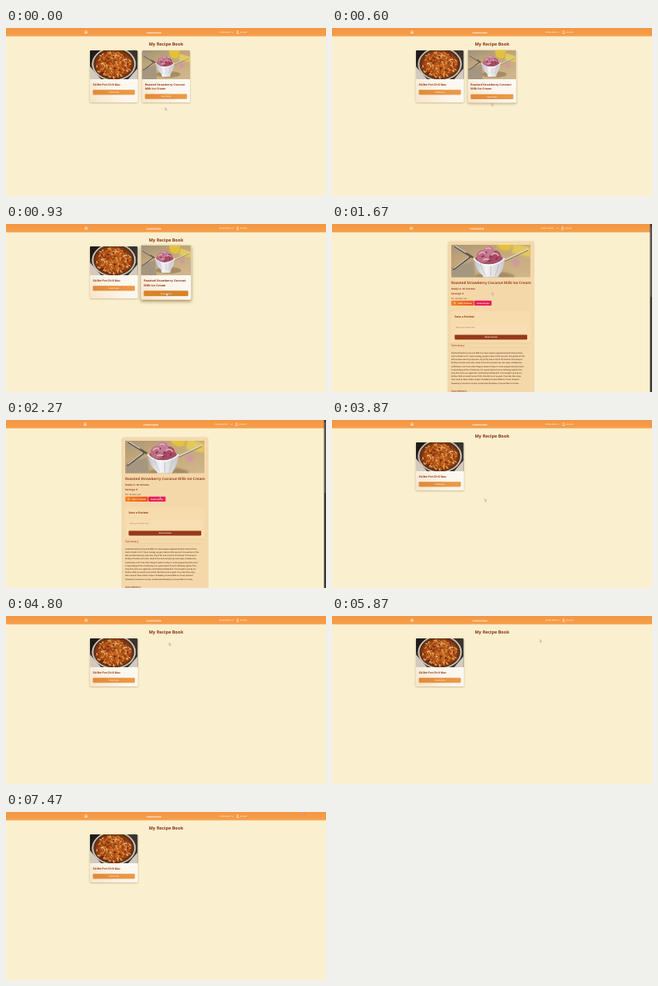
Recreate the animation shown at these times as an HTML page. Size 400 by 210 pixels, loop 8.4 s.

```html
<!DOCTYPE html>
<html lang="en">
<head>
<meta charset="utf-8">
<title>My Recipe Book</title>
<style>
html, body { margin: 0; width: 100%; height: 100%; overflow: hidden; background: #faf0cf; }
svg { display: block; width: 100vw; height: 100vh; }
text { font-family: "Open Sans", "Noto Sans", sans-serif; text-rendering: geometricPrecision; }
.bold { font-weight: 700; }
.semi { font-weight: 600; }
.mid { text-anchor: middle; }
.brown { fill: #8c3515; }
.white { fill: #fff; }
.shade { fill: #7a5a20; opacity: .4; filter: blur(.8px); }

.book, .detail, .pair, .single, .press, .arrow, .hand { animation: 8.4s step-end infinite; }
.book { animation-name: book; }
.detail { animation-name: detail; }
.pair { animation-name: pair; }
.single { animation-name: single; }
.press { animation-name: press; }
.arrow { animation-name: arrow; }
.hand { animation-name: hand; }
.lift { animation: lift 8.4s infinite; transform-origin: 200px 60.5px; }
.lift .glow { animation: glow 8.4s infinite; }
.glow { fill: #7a5a20; opacity: 0; filter: blur(1.8px); }
.dim { opacity: 0; }
.lift .dim { animation: dim 8.4s infinite; }
.cursor { animation: move 8.4s linear infinite; }

@keyframes book { 0%, 41.27% { visibility: visible } 19.84% { visibility: hidden } }
@keyframes detail { 0%, 41.27% { visibility: hidden } 19.84% { visibility: visible } }
@keyframes pair { 0% { visibility: visible } 19.84%, 100% { visibility: hidden } }
@keyframes single { 0% { visibility: hidden } 46.03%, 100% { visibility: visible } }
@keyframes press { 0% { fill: #ea1f58 } 34.1% { fill: #cf1a3a } 41.27%, 100% { fill: #ea1f58 } }
@keyframes arrow { 0%, 19.84%, 41.27% { opacity: 1 } 9.5%, 34.1% { opacity: 0 } }
@keyframes hand { 0%, 19.84%, 41.27% { opacity: 0 } 9.5%, 34.1% { opacity: 1 } }
@keyframes lift { 0%, 6.3% { transform: none } 10.7%, 100% { transform: scale(1.05) } }
@keyframes glow { 0%, 6.3% { opacity: 0 } 10.7%, 100% { opacity: .5 } }
@keyframes dim { 0%, 8.7% { opacity: 0 } 10.7%, 100% { opacity: 1 } }
@keyframes move {
  0%, 5% { transform: translate(199px, 99.5px) }
  10.5%, 23% { transform: translate(200px, 85.5px) }
  27%, 32.5% { transform: translate(192px, 95.5px) }
  34.1%, 52.4% { transform: translate(191px, 98.5px) }
  57.1%, 62.7% { transform: translate(204px, 33.5px) }
  69.8% { transform: translate(257.3px, 30px) }
  73% { transform: translate(351px, 9px) }
  76.19%, 100% { transform: translate(371px, .2px) }
}
</style>
</head>
<body>
<svg viewBox="0 0 400 210" preserveAspectRatio="none">
  <defs>
    <linearGradient id="bar" x2="0" y2="1"><stop stop-color="#f39642"/><stop offset="1" stop-color="#f79f4c"/></linearGradient>
    <linearGradient id="paper" x1="0" y1="1" x2=".7" y2=".2"><stop stop-color="#f7e4c8"/><stop offset=".5" stop-color="#fcf6ec"/><stop offset="1" stop-color="#fdfaf6"/></linearGradient>
    <linearGradient id="btn"><stop stop-color="#e08a38"/><stop offset="1" stop-color="#ee9a48"/></linearGradient>
    <linearGradient id="fire"><stop stop-color="#f58420"/><stop offset="1" stop-color="#e9531e"/></linearGradient>
    <linearGradient id="table" x2=".5" y2="1"><stop stop-color="#9c8f7c"/><stop offset=".45" stop-color="#c2a678"/><stop offset="1" stop-color="#cfb58a"/></linearGradient>
    <linearGradient id="bowl"><stop stop-color="#b9bec8"/><stop offset=".4" stop-color="#f3f3f4"/><stop offset="1" stop-color="#c9c8ca"/></linearGradient>
    <radialGradient id="stew"><stop stop-color="#c8671f"/><stop offset=".75" stop-color="#a94a16"/><stop offset="1" stop-color="#6f2f10"/></radialGradient>
    <filter id="soft"><feGaussianBlur stdDeviation=".7"/></filter>
    <clipPath id="top"><path d="M0 36V1.5Q0 0 1.5 0H58.5Q60 0 60 1.5V36Z"/></clipPath>
    <clipPath id="wide"><rect x="149" y="26" width="99" height="40.5"/></clipPath>
    <g id="sundae">
      <rect width="60" height="40" fill="url(#table)"/>
      <g filter="url(#soft)">
        <path d="M0 25L17 20L19 40H0Z" fill="#a5977f"/>
        <path d="M33 0H48L45 11Q40 14 35 9Z" fill="#e2c23c"/>
        <path d="M47 6L60 10V17L46 14Z" fill="#e3c85a"/>
        <circle cx="49" cy="21" r="3" fill="#cf9aa0"/>
        <ellipse cx="33" cy="32" rx="15" ry="4" fill="#8c7350" opacity=".6"/>
      </g>
      <g fill="none" stroke-linecap="round">
        <path d="M3 9L11 14L16 17M2 26L14 17" stroke="#5f564c" stroke-width="1.6"/>
        <path d="M3 8.5L11 13.500M2 25.500L13 17" stroke="#ddd8d0" stroke-width=".7"/>
        <path d="M41 19L58 11" stroke="#d9d4cb" stroke-width="1"/>
        <path d="M41 20L58 12" stroke="#75684f" stroke-width=".5"/>
      </g>
      <path d="M17 18Q18 27 24 31L25 35H35L36 31Q40 26 40.500 18Q29 13 17 18Z" fill="url(#bowl)"/>
      <ellipse cx="28.700" cy="18.500" rx="10.500" ry="4" fill="#a24d66"/>
      <circle cx="24" cy="16.500" r="4.800" fill="#bd6d84"/>
      <circle cx="33" cy="16.500" r="4.600" fill="#a94b66"/>
      <circle cx="28.500" cy="12.800" r="4.200" fill="#c47d92"/>
      <path d="M21 15q2-3 5-1M31 15q3-2 5 1M26 11q2-2 4 0M24 19q3-1 5 0" fill="none" stroke="#e3b3c0" stroke-width="1"/>
      <path d="M23 17l2-1M29 16l2 1M34 19l1-2M28 20l2-1M26 13l1 1" stroke="#84304d" stroke-width="1"/>
      <path d="M17 18Q22 23.500 29 23T40.500 18" fill="none" stroke="#fbfbfb" stroke-width="1"/>
      <path d="M22 22Q24 27 26 31M30 24V31M36 22Q35 27 33.500 31" fill="none" stroke="#aeb0b8" stroke-width=".4"/>
    </g>
    <g id="chili">
      <rect width="60" height="36" fill="#3b322c"/>
      <path d="M0 20L14 36H0ZM60 22L48 36H60Z" fill="#d3cabd"/>
      <path d="M0 0H14L3 14L0 20Z" fill="#201b19"/>
      <ellipse cx="30" cy="17" rx="27.500" ry="21" fill="#cbc4bb"/>
      <ellipse cx="30" cy="17" rx="25.500" ry="19.500" fill="#5a3018"/>
      <ellipse cx="30" cy="17.500" rx="24" ry="18" fill="url(#stew)"/>
      <g id="noodles" fill="none" stroke-linecap="round"></g>
    </g>
  </defs>

  <rect width="400" height="210" fill="#faf0cf"/>

  <g class="book">
    <g id="bookBar"></g>
    <text x="200" y="22" font-size="5.5" class="bold mid brown">My Recipe Book</text>
  </g>
  <g id="pair" class="pair"></g>
  <g id="single" class="single"></g>

  <g class="detail">
    <rect width="400" height="210" fill="#fbf0cd"/>
    <g id="detailBar"></g>
    <rect x="397.5" width="2.5" height="210" fill="#3a3735"/>
    <rect x="398.3" y="3" width="1" height="88" fill="#77716c"/>
    <rect class="shade" x="145.5" y="22.5" width="106.5" height="200" rx="1.5"/>
    <rect x="145.5" y="22" width="106.5" height="200" rx="1.5" fill="#f5d8aa"/>
    <g clip-path="url(#wide)"><use href="#sundae" transform="translate(149 13.3) scale(1.65)"/></g>
    <text x="149" y="74.7" font-size="4.55" class="bold" fill="#98441f">Roasted Strawberry Coconut Milk Ice Cream</text>
    <g font-size="2.9" class="brown">
      <text x="149" y="82"><tspan class="bold">Ready in:</tspan> <tspan class="bold">45 minutes</tspan></text>
      <text x="149" y="88" class="bold">Servings: 8</text>
      <text x="149" y="93.7">No reviews yet</text>
    </g>
    <rect x="149" y="95.7" width="28.5" height="6.4" rx="1" fill="url(#fire)"/>
    <circle cx="153.300" cy="98.700" r="1" fill="none" stroke="#fff" stroke-width=".4"/>
    <path d="M154 99.400l.9.9" stroke="#fff" stroke-width=".4"/>
    <text x="166.3" y="99.7" font-size="2.2" class="bold mid white">START COOKING</text>
    <rect class="press" x="178" y="95.7" width="21.5" height="6.4" rx="1"/>
    <text x="188.7" y="99.7" font-size="2.3" class="bold mid white">Delete Recipe</text>
    <rect x="149" y="109" width="99" height="38.5" rx="1" fill="#f7dcae"/>
    <text x="153.3" y="116.7" font-size="3.5" class="bold brown">Save a Review</text>
    <text x="153.5" y="123.6" font-size="4" letter-spacing="1.35" fill="#dfd0ac" style="font-family:'DejaVu Sans',sans-serif">☆☆☆☆☆</text>
    <rect x="153.300" y="126" width="90.700" height="10.500" rx=".8" fill="#f8deb2"/>
    <text x="154.800" y="130" font-size="2.250" fill="#94603a">Write your review here</text>
    <rect x="153.3" y="138.6" width="90.7" height="5.8" rx=".8" fill="#98391a"/>
    <text x="198.700" y="142.300" font-size="2.200" class="bold mid white">Submit Review</text>
    <path d="M149 149.300H248M149 154.600H248" stroke="#dfb67c" stroke-width=".3"/>
    <text x="149" y="153.200" font-size="3.700" class="brown">Summary</text>
    <g id="summary" font-size="2.2" fill="#4f2410" class="semi"></g>
    <text x="149" y="209.800" font-size="3.700" class="brown">Ingredients</text>
  </g>

  <g class="cursor">
    <path class="arrow" d="M0 0V3L.7 2.400L1.200 3.500L1.700 3.300L1.200 2.200H2.100Z" fill="#fff" stroke="#5b5048" stroke-width=".3"/>
    <path class="hand" d="M.5 0Q1 0 1 .5V1.500L2.700 1.900Q3 2 2.900 2.600L2.500 3.900H.9L-.4 2.400Q-.4 1.900 .1 2.100V.5Q.1 0 .5 0Z" fill="#fff" stroke="#4a2b22" stroke-width=".3"/>
  </g>
</svg>
<script>
const fill = (id, html) => { document.getElementById(id).innerHTML = html; };

const bar = (menu, brand, nav, label, arrow, user) => `
  <rect width="400" height="10.4" fill="url(#bar)"/>
  <path d="M${menu} 4.1h3.6m-3.6 1.3h3.6m-3.6 1.3h3.6" stroke="#fff" stroke-width=".6"/>
  <text x="${brand}" y="6.6" font-size="3" class="bold mid white">Cookmellow</text>
  <g font-size="2.3" class="white semi">
    <text x="${nav}" y="6.1">${label}</text>
    <text x="${user + 4.5}" y="6.1">Account</text>
  </g>
  <g fill="none" stroke="#fff" stroke-width=".5">
    <path d="M${arrow} 4.7l1.1 1.1l1.1 -1.1"/>
    <circle cx="${user + 1.5}" cy="4.3" r=".8"/><path d="M${user} 6.9q1.5 -2.7 3 0z"/>
  </g>`;

const card = (x, height, lines, photo, cls = "") => {
  const btnY = 72.2 + lines.length * 5.1;
  const box = (y, attrs) => `<rect x="${x}" y="${y}" width="60" height="${height}" rx="1.5" ${attrs}/>`;
  const button = attrs => `<rect x="${x + 3.7}" y="${btnY}" width="52.6" height="6.3" rx="1" ${attrs}/>`;
  return `<g class="${cls}">
    ${box(30.5, 'class="glow"')}${box(28.7, 'class="shade"')}${box(28, 'fill="url(#paper)"')}
    <g transform="translate(${x} 28)" clip-path="url(#top)">${photo}</g>
    ${lines.map((s, i) => `<text x="${x + 3.7}" y="${71.7 + i * 5.1}" font-size="3.5" class="bold brown">${s}</text>`).join("")}
    ${button('fill="url(#btn)"')}${button('class="dim" fill="#d8832a"')}
    <text x="${x + 30}" y="${btnY + 3.9}" font-size="2.25" class="semi mid white">View Recipe</text>
  </g>`;
};

let seed = 11;
const rand = () => (seed = seed * 16807 % 2147483647) / 2147483647;
const tones = ["#efb055", "#d4691f", "#f6cf82", "#8f3410", "#d9832f", "#5c200c"];
let noodles = "";
for (let i = 0; i < 230; i++) {
  const a = rand() * Math.PI * 2, r = Math.sqrt(rand()), turn = rand() * 360;
  const x = 30 + Math.cos(a) * r * 22.5, y = 17.5 + Math.sin(a) * r * 16.5;
  noodles += `<path d="M-1.2 0q1.2 -1.4 2.4 0" stroke="${tones[i % tones.length]}" stroke-width="${(.6 + rand() * .6).toFixed(2)}"
    transform="translate(${x.toFixed(1)} ${y.toFixed(1)}) rotate(${turn.toFixed()})"/>`;
}
fill("noodles", noodles);

const chili = ["Skillet Pot Chili Mac"], sundae = ["Roasted Strawberry Coconut", "Milk Ice Cream"];
const chiliPhoto = '<use href="#chili"/>', sundaePhoto = '<use href="#sundae" y="-2"/>';
fill("bookBar", bar(98.3, 184.8, 267, "Recipe Book", 281.8, 288));
fill("detailBar", bar(97.2, 181, 261.3, "Recipe Details", 280.8, 286.7));
fill("pair", card(104.8, 65, chili, chiliPhoto) + card(170, 65, sundae, sundaePhoto, "lift"));
fill("single", card(104.8, 60, chili, chiliPhoto));

const summary = [
  "Roasted Strawberry Coconut Milk Ice Cream requires approximately 45 minutes from",
  "start to finish. For $1.15 per serving, you get a dessert that serves 8. One portion of this",
  "dish contains about 2g of protein, 21g of fat, and a total of 372 calories. This recipe is",
  "liked by 2 foodies and cooks. Head to the store and pick up cane sugar, strawberries,",
  "vanilla bean, and a few other things to make it today. It can be enjoyed any time, but it",
  "is especially good for a family day. It is a good option if you're following a gluten free,",
  "dairy free, lacto ovo vegetarian, and fodmap friendly diet. It is brought to you by our",
  "kitchen. With an overall score of 36%, this dish is not so great. If you like this recipe,",
  "take a look at these similar recipes: Strawberry Coconut Milk Ice Cream, Roasted",
  "Strawberry Coconut Ice Cream, and Roasted Strawberry Coconut Milk Ice Cream."
];
fill("summary", summary.map((s, i) => `<text x="149" y="${161.8 + i * 4.2}">${s}</text>`).join(""));
</script>
</body>
</html>
```
